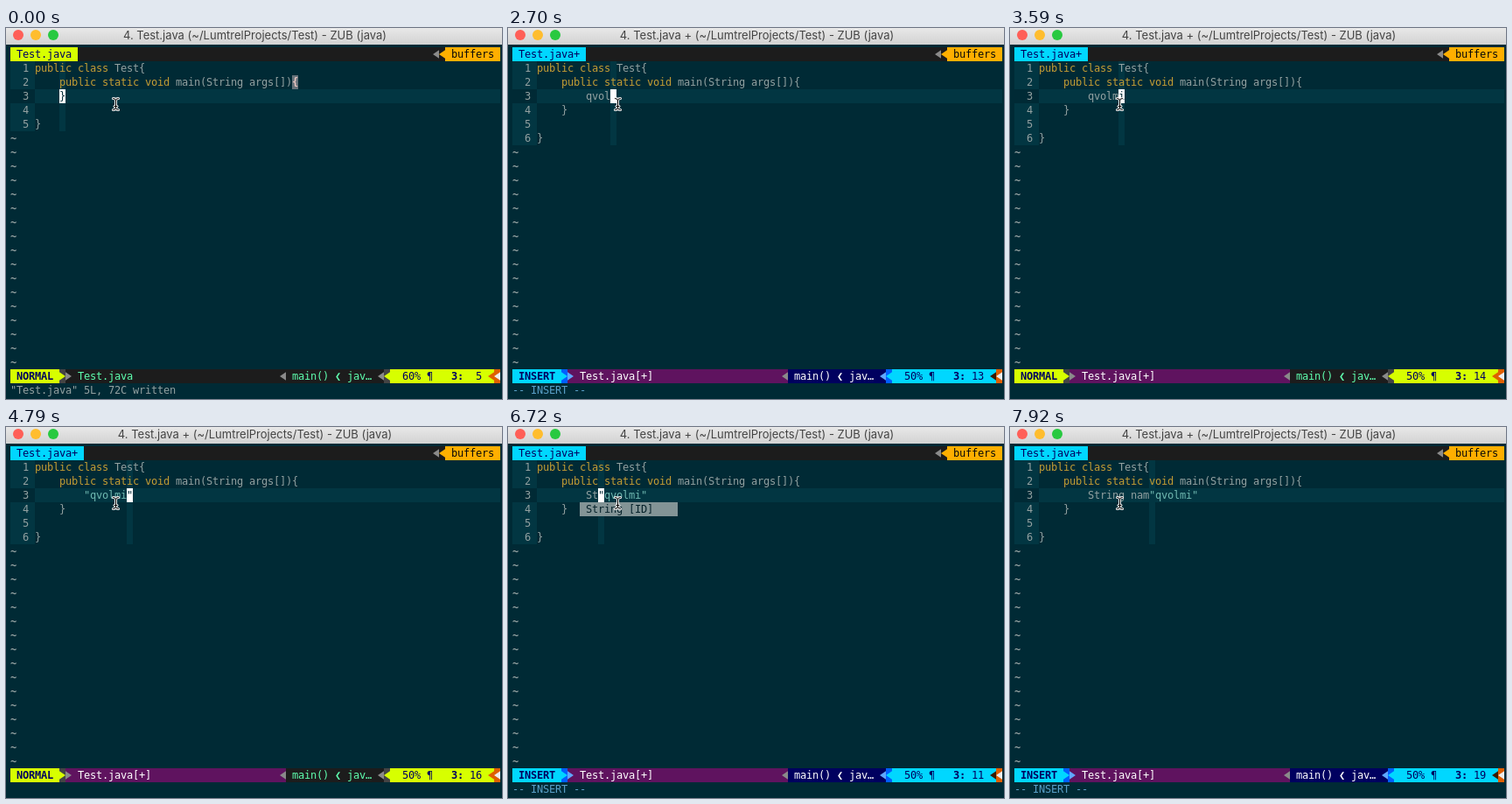
Recreate the animation shown at these times as an HTML page with a canvas. Size 567x424 px, loop 8 s.

```html
<!DOCTYPE html>
<html lang="en">
<head>
<meta charset="utf-8">
<title>Terminal editor</title>
<style>
  html, body { margin: 0; width: 567px; height: 424px; overflow: hidden; background: #002a35; }
  canvas { display: block; }
</style>
</head>
<body>
<canvas id="stage" width="567" height="424"></canvas>
<script>
const ctx = document.getElementById('stage').getContext('2d');
const LOOP = 8000;
const CELL = 7, ROW = 16, LEFT = 5, TOP = 22;
const GUTTER = 4, CURSOR_ROW = 3, STATUS_ROW = 23, CMD_ROW = 24;
const MONO = '"DejaVu Sans Mono", monospace';
const WORD = 'qvolmi';

const C = {
  bg: '#002a35', line: '#023642', text: '#93a1a1', keyword: '#c59d34', string: '#70b8b0',
  bar: '#1c1c1c', navy: '#00005f', purple: '#5f135f', mint: '#5fffaf', white: '#ffffff',
  orange: '#ffaf00', warning: '#df5f00', grey: '#8a8a8a', popup: '#839496', modeMsg: '#5aa0c8',
  yellow: '#d7ff00', cyan: '#00d7ff'
};

const MODES = {
  NORMAL: { main: C.yellow, step: '#444444', stepArrow: '#8a8a8a', tail: C.warning,
            side: C.bar, sideText: C.mint },
  INSERT: { main: C.cyan, step: '#005fff', stepArrow: '#5fa8ff', tail: '#3a1c00',
            side: C.navy, sideText: C.white }
};

// Each step lists only what changes at that time; the rest carries over.
const steps = [
  [0, { mode: 'NORMAL', saved: true, code: '', col: 5, cursor: true, popup: false, pending: '',
        message: '"Test.java" 5L, 72C written' }],
  [1500, { mode: 'INSERT', saved: false, col: 9, message: '-- INSERT --' }],
  [2100, { code: WORD.slice(0, 1), col: 10 }],
  [2250, { cursor: false }],
  [2400, { code: WORD.slice(0, 3), col: 12, cursor: true }],
  [2700, { code: WORD.slice(0, 4), col: 13 }],
  [2850, { code: WORD.slice(0, 5), col: 14 }],
  [3000, { code: WORD, col: 15 }],
  [3290, { code: WORD + 'j', pending: 'j' }],
  [3440, { code: WORD, pending: '', message: '', cursorCol: 14 }],
  [3590, { mode: 'NORMAL', col: 14, cursorCol: 0 }],
  [4190, { pending: ';' }],
  [4790, { code: `"${WORD}"`, col: 16, pending: '' }],
  [5990, { mode: 'INSERT', col: 9, message: '-- INSERT --' }],
  [6430, typed('S')],
  [6580, { cursor: false }],
  [6720, { ...typed('St'), cursor: true, popup: true }],
  [7020, typed('Str')],
  [7170, typed('Strin')],
  [7320, typed('String')],
  [7470, { ...typed('String '), popup: false }],
  [7620, typed('String n')],
  [7770, typed('String na')],
  [7920, { ...typed('String nam'), cursor: false }]
];

function typed(prefix) {
  return { code: `${prefix}"${WORD}"`, col: 9 + prefix.length };
}

function stateAt(time) {
  const state = {};
  for (const [start, change] of steps) {
    if (start <= time) Object.assign(state, change);
  }
  return state;
}

const cellX = col => LEFT + col * CELL;
const cellY = row => TOP + row * ROW;

function fill(col, row, cols, rows, color) {
  ctx.fillStyle = color;
  ctx.fillRect(cellX(col), cellY(row), cols * CELL, rows * ROW);
}

function put(col, row, text, color, bold = false) {
  ctx.font = `${bold ? 'bold ' : ''}12px ${MONO}`;
  ctx.textAlign = 'left';
  ctx.fillStyle = color;
  [...text].forEach((ch, i) => {
    if (ch !== ' ') ctx.fillText(ch, cellX(col + i), cellY(row) + 12);
  });
}

function arrow(col, row, dir, color) {
  const mid = cellX(col) + CELL / 2, y = cellY(row) + 8;
  ctx.fillStyle = color;
  ctx.beginPath();
  ctx.moveTo(mid + 3.5 * dir, y);
  ctx.lineTo(mid - 3.5 * dir, y - 4.8);
  ctx.lineTo(mid - 3.5 * dir, y + 4.8);
  ctx.fill();
}

function drawTitle(s) {
  const shade = ctx.createLinearGradient(0, 0, 0, 19);
  shade.addColorStop(0, '#e8e8e8');
  shade.addColorStop(1, '#d2d2d2');
  ctx.fillStyle = shade;
  ctx.fillRect(0, 0, 567, 19);
  ['#ff5f57', '#ffbd2e', '#28c940'].forEach((color, i) => {
    ctx.fillStyle = color;
    ctx.beginPath();
    ctx.arc(14 + i * 20, 8, 6, 0, Math.PI * 2);
    ctx.fill();
  });
  ctx.font = '13px Inter, sans-serif';
  ctx.textAlign = 'center';
  ctx.fillStyle = '#444444';
  ctx.fillText(`4. Test.java ${s.saved ? '' : '+ '}(~/LumtrelProjects/Test) - ZUB (java)`, 284.5, 13);
}

function drawTabs(s) {
  const label = ` Test.java${s.saved ? '' : '+'} `;
  fill(0, 0, 80, 1, C.bar);
  fill(0, 0, label.length, 1, s.saved ? C.yellow : C.cyan);
  put(0, 0, label, C.navy);
  arrow(69, 0, -1, C.grey);
  arrow(70, 0, -1, C.orange);
  fill(71, 0, 9, 1, C.orange);
  put(72, 0, 'buffers', '#080808');
}

function putCode(row, source) {
  let col = GUTTER;
  for (const [token] of source.matchAll(/"[^"]*"|\w+|[^\w"]+/g)) {
    const color = /^(public|class|static|void)$/.test(token) ? C.keyword
      : token[0] === '"' ? C.string : C.text;
    put(col, row, token, color);
    col += token.length;
  }
}

function drawEditor(s) {
  const indent = ' '.repeat(4);
  const lines = ['public class Test{', indent + 'public static void main(String args[]){'];
  if (!s.saved) lines.push(indent + indent + s.code);
  lines.push(indent + '}', '', '}');

  fill(0, 1, GUTTER, lines.length, C.line);
  fill(0, CURSOR_ROW, GUTTER, 1, C.bg);
  fill(GUTTER, CURSOR_ROW, 76, 1, C.line);
  fill(GUTTER + s.col - 1, 1, 1, lines.length, C.line);
  lines.forEach((source, i) => {
    put(2, i + 1, String(i + 1), C.text);
    putCode(i + 1, source);
  });
  for (let row = lines.length + 1; row < STATUS_ROW; row++) put(0, row, '~', C.text, true);

  if (s.saved) {
    const brace = GUTTER + lines[1].length - 1;
    fill(brace, 2, 1, 1, '#66727a');
    put(brace, 2, '{', '#e6c4c0', true);
  }
  if (s.cursor) {
    const index = (s.cursorCol || s.col) - 1;
    fill(GUTTER + index, CURSOR_ROW, 1, 1, C.white);
    put(GUTTER + index, CURSOR_ROW, lines[2][index] || ' ', C.bg);
  }
  if (s.popup) {
    fill(11, 4, 16, 1, C.popup);
    put(12, 4, 'String [ID]', '#06222b');
  }
}

function drawStatus(s, mode) {
  const r = STATUS_ROW;
  fill(0, r, 80, 1, mode.side);
  fill(0, r, 8, 1, mode.main);
  put(1, r, s.mode, C.navy, true);
  fill(8, r, 1, 1, mode.step);
  arrow(8, r, 1, mode.main);

  fill(9, r, 36, 1, s.saved ? C.bar : C.purple);
  arrow(9, r, 1, mode.stepArrow);
  put(11, r, s.saved ? 'Test.java' : 'Test.java[+]', s.saved ? C.mint : C.white);
  arrow(44, r, -1, C.grey);
  put(46, r, 'main() ❮ jav…', mode.sideText);

  arrow(60, r, -1, mode.stepArrow);
  fill(61, r, 1, 1, mode.step);
  arrow(61, r, -1, mode.main);
  fill(62, r, 17, 1, mode.main);
  put(64, r, `${s.saved ? 60 : 50}% ¶`, C.navy);
  put(72, r, '3:', C.navy, true);
  put(75, r, String(s.col).padStart(2), C.navy);
  arrow(78, r, -1, mode.tail);
  fill(79, r, 1, 1, C.warning);
  arrow(79, r, -1, '#eeeeee');

  put(0, CMD_ROW, s.message, s.message.startsWith('--') ? C.modeMsg : C.text);
  put(69, CMD_ROW, s.pending, C.text);
}

function drawPointer() {
  ctx.lineCap = 'round';
  for (const [width, color] of [[3, '#f4f4f4'], [1, '#000000']]) {
    ctx.lineWidth = width;
    ctx.strokeStyle = color;
    ctx.beginPath();
    for (const side of [-3, 3]) {
      ctx.moveTo(125.5 + side, 80.5);
      ctx.quadraticCurveTo(125.5, 80.5, 125.5, 83);
      ctx.lineTo(125.5, 91);
      ctx.quadraticCurveTo(125.5, 93.5, 125.5 + side, 93.5);
    }
    ctx.moveTo(124, 89.5);
    ctx.lineTo(127, 89.5);
    ctx.stroke();
  }
}

function frame() {
  const s = stateAt(performance.now() % LOOP);
  const mode = MODES[s.mode];
  ctx.fillStyle = C.bg;
  ctx.fillRect(0, 0, 567, 424);
  drawTitle(s);
  drawTabs(s);
  drawEditor(s);
  drawStatus(s, mode);
  drawPointer();
  requestAnimationFrame(frame);
}
frame();
</script>
</body>
</html>
```
